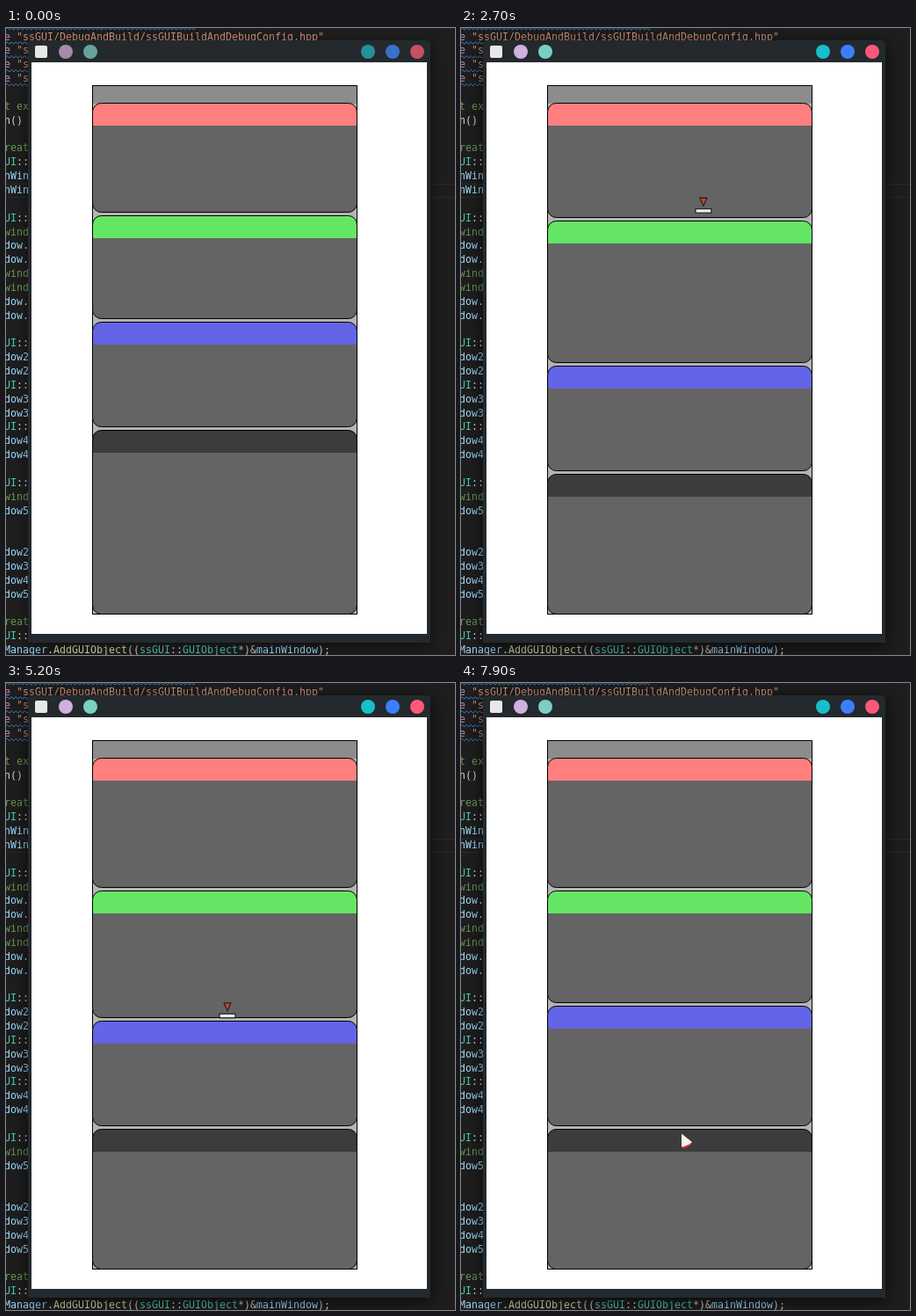
Recreate the animation shown at these times as an HTML page. Size 511 px wide and 713 px high, loop 8000 ms.

```html
<!DOCTYPE html>
<html lang="en">
<head>
<meta charset="utf-8">
<title>Stacked windows</title>
<style>
html, body { margin: 0; width: 100%; height: 100%; overflow: hidden; background: #1e1e1e; }
#stage { position: relative; width: 511px; height: 713px; overflow: hidden; background: #1e1e1e; }
#code div {
  position: absolute; left: -2px; white-space: pre;
  font: 11.63px/15.85px "DejaVu Sans Mono", monospace; color: #d4d4d4;
}
#line { position: absolute; left: 0; top: 177px; width: 511px; height: 14px; border: solid #2a2a2a; border-width: 1px 0; }
.k { color: #c586c0; } .s { color: #ce9178; } .c { color: #6a9955; }
.t { color: #4ec9b0; } .v { color: #9cdcfe; } .f { color: #dcdcaa; }
svg { position: absolute; left: 0; top: 0; }
#win {
  position: absolute; left: 25px; top: 14px; width: 458px; height: 685px;
  border-radius: 5px 5px 0 0; background: #23292d; box-shadow: 0 4px 16px rgba(0,0,0,.5);
}
#win.on { box-shadow: 0 4px 20px rgba(0,0,0,.7); }
#win i { position: absolute; top: 5px; width: 16px; height: 16px; border-radius: 50%; background: var(--off); }
#win.on i { background: var(--on); }
#icon { position: absolute; left: 8px; top: 6px; width: 14px; height: 14px; border-radius: 2px; background: #e8e8e6; }
#client { position: absolute; left: 4px; top: 25px; width: 450px; height: 650px; background: #fff; }
</style>
</head>
<body>
<div id="stage">
  <div id="line"></div>
  <div id="code"></div>
  <svg width="511" height="713"><path id="wave" fill="none" stroke="#3a86d8"/></svg>
  <div id="win">
    <b id="icon"></b>
    <i style="left:35px;--off:#a58cab;--on:#ceb1dc"></i>
    <i style="left:63px;--off:#65a49c;--on:#7bcfc2"></i>
    <i style="left:378.5px;--off:#24929b;--on:#17bfcb"></i>
    <i style="left:406.5px;--off:#3a6fcb;--on:#3d7dff"></i>
    <i style="left:434.5px;--off:#c74f63;--on:#ff587b"></i>
    <div id="client"></div>
  </div>
  <svg width="511" height="713">
    <rect x="98.5" y="65.5" width="301" height="601" fill="#b4b4b4" stroke="#000"/>
    <rect x="99" y="66" width="300" height="20" fill="#8c8c8c"/>
    <g id="panels"></g>
    <g id="arrow">
      <path d="M0 0L13 10.5Q9 17.5 0 18Z" fill="#c23a32" stroke="#3a3030" stroke-linejoin="round"/>
      <path d="M0 .5L12 10Q8 14 0 15.5Z" fill="#f4f4f4"/>
    </g>
    <g id="resize" stroke="#262626" stroke-width="1.3">
      <path d="M-4 -14.7H4L0 -5.5Z" fill="#c8452f" stroke-linejoin="round"/>
      <rect x="-9" y="-2.3" width="18" height="4.6" fill="#ececec"/>
    </g>
  </svg>
</div>
<script>
const $ = id => document.getElementById(id);
const LOOP = 8000, STEP = 100, PITCH = 15.85;

// Code rows: "class=text|class=text", an empty entry skips a row
const ns = "t=UI|=::", inc = 'k=e |s="s', note = "c=wind", dot = "v=dow|=.";
const win = n => "v=dow" + n;
const setup = n => [ns, win(n), win(n)];
const rows = [
  'k=e |s="ssGUI/DebugAndBuild/ssGUIBuildAndDebugConfig.hpp"', inc, inc, inc, "",
  "c=t ex", "f=n|=()", "", "c=reat", ns, "v=nWin", "v=nWin", "",
  ns, note, dot, dot, note, note, dot, dot, "",
  ...[2, 3, 4].flatMap(setup), "",
  ns, note, win(5), "", "", ...[2, 3, 4, 5].map(win), "",
  "c=reat", ns,
  "v=Manager|=.|f=AddGUIObject|=((|t=ssGUI|=::|t=GUIObject|=*)&|v=mainWindow|=);"
];
rows.forEach((row, n) => {
  if (!row) return;
  const div = document.createElement("div");
  div.style.top = 2.6 + n * PITCH + "px";
  for (const part of row.split("|")) {
    const cut = part.indexOf("="), span = document.createElement("span");
    span.className = part.slice(0, cut);
    span.textContent = part.slice(cut + 1);
    div.append(span);
  }
  $("code").append(div);
});

const wave = (y, width) => `M0 ${y}` + "q1.25 -2.6 2.5 0t2.5 0".repeat(width / 5);
$("wave").setAttribute("d", wave(.8, 215) + [0, 1, 2, 3].map(n => wave(17 + n * PITCH, 25)).join(""));

function addPath(attrs) {
  const el = document.createElementNS("http://www.w3.org/2000/svg", "path");
  for (const k in attrs) el.setAttribute(k, attrs[k]);
  $("panels").append(el);
  return el;
}
const panels = ["#ff7f7f", "#64e664", "#6464e6", "#3c3c3c"].map(color => ({
  body: addPath({ fill: "#646464" }),
  head: addPath({ fill: color }),
  edge: addPath({ fill: "none", stroke: "#000" })
}));

const R = 10, L = 98.5, W = 301;
function place(panel, top, bottom) {
  const arc = (dx, dy) => `a${R} ${R} 0 0 1 ${dx * R} ${dy * R}`;
  const cap = `V${top + .5 + R}${arc(1, -1)}h${W - 2 * R}${arc(1, 1)}`;
  const low = bottom - .5 - R;
  const box = `M${L} ${low}${cap}V${low}${arc(-1, 1)}h${2 * R - W}${arc(-1, -1)}Z`;
  panel.body.setAttribute("d", box);
  panel.edge.setAttribute("d", box);
  panel.head.setAttribute("d", `M${L} ${top + 26}${cap}V${top + 26}Z`);
}

// Eased glide through [time, value] turning points
const glide = (...keys) => t => {
  const i = keys.findIndex(k => k[0] > t);
  if (i <= 0) return keys.at(i)[1];
  const [t0, a] = keys[i - 1], [t1, b] = keys[i], p = (t - t0) / (t1 - t0);
  return a + (b - a) * p * p * (3 - 2 * p);
};

const split1 = glide([1300, 210], [1950, 326], [2130, 326], [2420, 254], [2500, 254],
  [2800, 203], [3140, 270], [3400, 168], [3700, 233]);
const split2 = glide([5300, 381], [6000, 442], [6100, 442], [6520, 330], [7100, 364]);
const handX = glide([600, 399], [1100, 295], [1300, 295], [2100, 276], [2500, 275],
  [3700, 287], [3800, 287], [4500, 252], [5200, 252], [6300, 239], [7100, 246], [7700, 251]);
const freeY = glide([600, 232], [1100, 205], [3800, 228], [4200, 357], [4300, 357],
  [4500, 373], [5100, 378], [7100, 361], [7700, 510], [7800, 510], [7900, 512]);

const GAP = 3, MIN = 52, LEAD = 15;
function draw(t) {
  // While pushing, the second panel at its minimum shoves the lower ones down
  const pushing = t < 1950;
  const b1 = Math.round(split1(t));
  const b2 = pushing ? Math.max(331, b1 + GAP + MIN) : Math.round(split2(t));
  const b3 = pushing ? b2 + 123 : 504;
  const ends = [85 - GAP, b1, b2, b3, 667];
  panels.forEach((p, i) => place(p, ends[i] + GAP, ends[i + 1]));

  // The pointer runs slightly ahead of the edge it drags
  const first = t >= 1100 && t < 3900, second = t >= 5100 && t < 7200;
  const y = first ? split1(t + LEAD) - 5 : second ? split2(t + LEAD) - 2.5 : freeY(t);
  const shape = first || second ? "resize" : "arrow";
  for (const id of ["arrow", "resize"]) {
    $(id).setAttribute("transform", `translate(${handX(t)} ${y})`);
    $(id).style.display = t >= 600 && id === shape ? "" : "none";
  }
  $("win").classList.toggle("on", t >= 1400);
}

const start = performance.now();
function tick() {
  const t = (performance.now() - start) % LOOP;
  draw(Math.floor(t / STEP) * STEP);
  requestAnimationFrame(tick);
}
tick();
</script>
</body>
</html>
```
